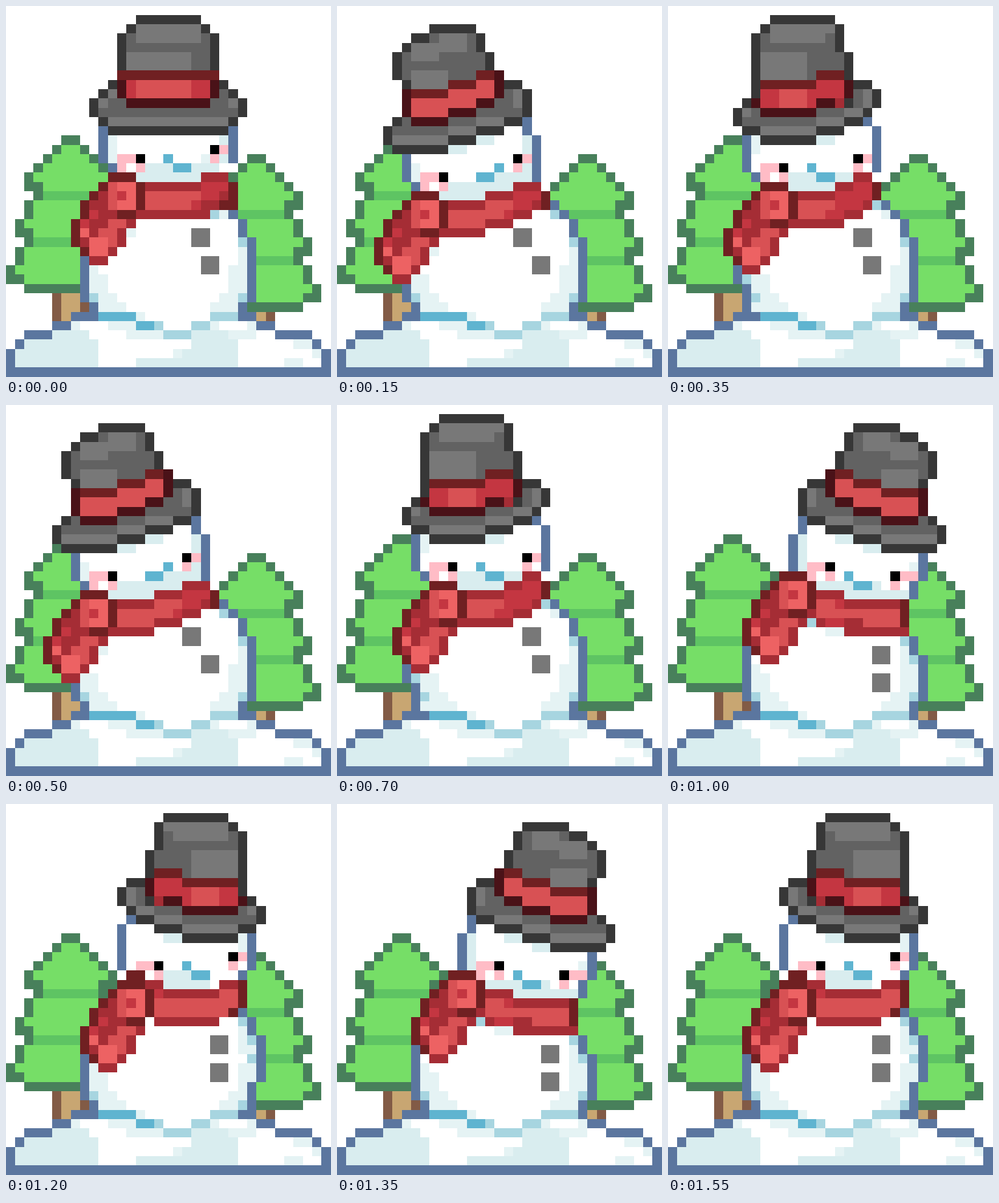
An HTML page with a canvas that plays this animation: 500x571 px, repeating every 1650 ms.

```html
<!DOCTYPE html>
<html lang="en">
<head>
<meta charset="utf-8">
<title>Swaying snowman</title>
<style>
html, body { margin: 0; height: 100%; overflow: hidden; background: #fff; }
canvas { display: block; }
</style>
</head>
<body>
<canvas width="500" height="571"></canvas>
<script>
const screen2d = document.querySelector('canvas').getContext('2d');
screen2d.imageSmoothingEnabled = false;

// The art is drawn small, with a spare column and row for the enlarged copy.
const art = document.createElement('canvas');
art.width = 36;
art.height = 41;
const ctx = art.getContext('2d');

const colours = {
  white: '#fff', black: '#000', pink: '#ffbcc6', blue: '#5b769f', cyan: '#5fb4d0', ice: '#a7d5e0',
  shade: '#d9edef', pale: '#e5f3f4', leaf: '#76de67', leafBand: '#5ec463', leafEdge: '#48805b',
  bark: '#825b46', wood: '#c8a672', coal: '#373737', felt: '#626262', feltLight: '#787878',
  wine: '#4a1218', deep: '#702022', red: '#a52d35', crimson: '#c43641', rose: '#d85154', coral: '#ed6263'
};

// Fills one path per colour, in order; one unit is one art pixel.
function paint(layers, x = 0, y = 0, mirrored = false) {
  ctx.setTransform(mirrored ? -1 : 1, 0, 0, 1, mirrored ? 35 - x : x, y);
  for (const name in layers) {
    ctx.fillStyle = colours[name];
    ctx.fill(new Path2D(layers[name]));
  }
}

const tree = {
  bark: 'M5 31h4v3h-4z',
  wood: 'M6 31h2v3h-2z',
  leafEdge: 'M6 14h2v1h1v1h1v1h1v1h1v2h-1v1h1v2h1v2h-1v1h1v2h1v2h-2v1H2v-1H0v-2h1v-2h1v-1H1v-2h1v-2h1v-1H2v-2h1v-1h1v-1h1v-1h1z',
  leaf: 'M6 15h2v1h1v1h1v1h1v1h-1v1H4v-1H3v-1h1v-1h1v-1h1z M3 21h8v2h1v1h-1v1H3v-1H2v-1h1z M2 26h10v2h1v1h-1v1H2v-1H1v-1h1z',
  leafBand: 'M4 20h6v1H4z M3 25h8v1H3z'
};

const ground = {
  white: 'M24 34h5v2h-5z',
  shade: 'M5 35h4v1h1v3H1v-2h1v-1h3z M20 35h4v1h1v3H14v-1h5v-1h1z',
  pale: 'M7 34h1v1H7z M11 34h3v1h3v1h-4v-1h-2z M14 33h1v1h-1z M22 34h1v1h-1z M26 34h1v1h-1z M24 35h3v1h-3z M18 37h1v1h-1z M31 36h2v1h1v1h-1v-1h-2z M30 38h2v1h-2z',
  ice: 'M16 34h1v1h-1z M17 35h3v1h-3z M20 34h2v1h-2z M22 33h3v1h-3z',
  cyan: 'M10 33h4v1h-4z M14 34h2v1h-2z',
  blue: 'M7 33h3v1H7z M25 33h2v1h-2z M5 34h2v1H5z M27 34h2v1h-2z M2 35h3v1H2z M29 35h4v1h-4z M1 36h1v1H1z M33 36h1v1h-1z M0 37h1v2h33v-2h1v3H0z'
};

const hats = {
  upright: {
    coal: 'M14 1h7v1h1v1h1v5h1v1h1v1h1v2h-1v1h-1v1H11v-1h-1v-1H9v-2h1V9h1V8h1V3h1V2h1z',
    felt: 'M14 2h7v1h1v4h-9V3h1z M11 9h1v1h11V9h1v1h1v2h-1v1H11v-1h-1v-2h1z',
    feltLight: 'M14 2h7v2h-7z M13 5h7v2h-7z M11 9h1v1h-1v1h-1v-1h1z M24 10h1v1h-1z M11 12h13v1H11z',
    deep: 'M12 7h11v1H12z',
    wine: 'M12 8h1v2h9V8h1v2h-1v1h-9v-1h-1z',
    crimson: 'M13 8h9v2h-9z',
    rose: 'M14 8h6v2h-6z'
  },
  leaning: {
    coal: 'M11 1h7v1h1v3h1v3h2v1h1v2h-1v1h-1v1h-2v1h-3v1h-6v-1h-2v-1h-1v-2h1v-1h1V3h1V2h1z',
    felt: 'M10 3h8v2h1v3h-9z M20 9h2v2h-1v1h-2v1h-3v1h-6v-1H8v-2h12z',
    feltLight: 'M11 2h7v1h-1v1h-6z M10 5h5v3h-5z M21 9h1v2h-1z M8 11h1v1H8z M10 13h6v1h-6z M19 11h2v1h-2z M16 12h3v1h-3z',
    deep: 'M16 7h3v1h-3v1h-6V8h6z',
    crimson: 'M16 8h3v2h-3v1h-6V9h6z',
    rose: 'M12 9h3v2h-3z',
    wine: 'M19 8h1v2h-1v1h-3v1h-6v-1H9v-1h1v1h6v-1h3z',
    red: 'M18 10h1v1h-1z'
  },
  bowed: {
    coal: 'M10 2h5v1h1v2h1v2h1v1h2v1h1v3h-1v1h-2v1h-3v1h-3v1H6v-1H5v-2h1v-1h1V8H6V5h1V4h1V3h2z',
    felt: 'M10 3h5v2h1v2h-1v1h-3v1H8V8H7V5h1V4h2z M18 9h2v3h-2v1h-3v1h-3v1H6v-2h1v-1h5v-1h3v-1h3z',
    feltLight: 'M11 3h3v2h-3v1H8V4h3z M8 7h4v2H8z M19 9h1v2h-1z M15 12h3v1h-3v1h-3v-1h3z M6 14h6v1H6z',
    wine: 'M17 7h1v3h-1v1h-2v1h-3v1H8v-1H7V9h1v3h4v-1h3v-1h2z',
    deep: 'M15 7h2v1h-1v1h-4v1H8V9h4V8h3z',
    rose: 'M15 8h2v2h-2v1h-3v1H8v-2h4V9h3z'
  }
};

const heads = {
  upright: {
    white: 'M11 13h13v6H11z',
    pale: 'M11 14h1v3h-1z M21 16h1v1h-1z',
    shade: 'M23 14h1v1h-1z M23 16h1v1h-1z M15 17h8v1h-1v1h-8v-1h1z',
    blue: 'M10 13h1v4h-1z M24 13h1v4h-1z M11 17h1v1h-1z'
  },
  leaning: {
    white: 'M9 12h12v1h1v7H10v-2H9z',
    pale: 'M9 14h1v2H9z',
    shade: 'M16 14h2v1h-2z M13 18h7v1h-2v1h-5z',
    blue: 'M21 12h1v1h-1z M22 13h1v5h-1z M8 14h1v4H8z M9 18h1v1H9z'
  },
  bowed: {
    white: 'M8 12h12v2h1v7H9v-2H8z',
    pale: 'M8 17h1v2H8z',
    shade: 'M20 14h1v4h-1z M15 14h2v1h-2z M12 15h2v1h-2z M17 18h4v1h-4z M12 19h7v1h-3v1H9v-1h3z',
    blue: 'M20 12h1v2h-1z M21 14h1v5h-1z M7 16h1v3H7z M8 19h1v2H8z'
  }
};

const knot = {
  red: 'M11 18h3v1h1v3h-1v2h-1v2h-1v1h-1v1H9v-1H8v-1H7v-3h1v-2h1v-1h1v-1h1z',
  deep: 'M11 18h3v1h-3z M14 19h1v3h-1v1h-2v-1h2z M10 19h1v1h-1v1H9v2H8v-2h1v-1h1z M7 23h1v3H7z M8 26h1v1H8z',
  rose: 'M11 19h1v3h-1z M11 23h2v1h-1v2h-1v-1h-1v-1h1z',
  coral: 'M12 19h2v3h-2z M8 24h1v1H8z M9 25h2v2H9z',
  crimson: 'M12 20h1v1h-1z M9 22h1v1H9v1H8v-1h1z'
};

const leftShade = { pale: 'M9 28h1v1h1v2h1v1h1v1H9z', ice: 'M9 31h1v1H9z' };
const rightShade = { pale: 'M25 26h1v6h-1v1h-3v-1h1v-1h1v-3h1z', ice: 'M25 25h1v1h-1z M25 31h1v1h-1z' };
const leftEye = { pink: 'M-2 0h2v1h1v1h-1v-1h-1v1h-1z', white: 'M-1 1h1v1h-1z', black: 'M0 0h1v1H0z' };
const rightEye = { pink: 'M1 0h1v1h-1v1h-1v-1h1z', black: 'M0 0h1v1H0z' };
const nose = { cyan: 'M0 0h1v1h2v1H1V1H0z' };
const button = { feltLight: 'M0 0h2v2H0z' };

const poses = {
  centre: {
    tilt: 'upright', knot: [0, 0], shadeLeft: 0, shadeRight: 0,
    eyes: [14, 16, 22, 15], nose: [17, 16], buttons: [20, 24, 21, 27],
    body: {
      white: 'M9 22h15v1h1v2h1v7h-1v1H9z',
      ice: 'M22 22h1v1h-1z',
      pale: 'M23 22h1v1h-1z M13 24h1v1h-1z',
      blue: 'M8 27h1v5H8z M9 32h1v1H9z M24 22h1v1h-1z M25 23h1v2h-1z M26 25h1v7h-1z M25 32h1v1h-1z'
    },
    scarf: {
      red: 'M21 18h3v4h-2v1h-8v-4h7z',
      rose: 'M15 20h6v2h-6z',
      crimson: 'M21 19h3v1h-1v1h-2v1h-1v-1h1z',
      deep: 'M24 19h1v3h-2v-1h1z'
    }
  },
  left: {
    tilt: 'leaning', knot: [-1, 1], shadeLeft: 0, shadeRight: 0,
    eyes: [12, 17, 20, 16], nose: [15, 17], buttons: [20, 24, 21, 27],
    body: {
      white: 'M10 21h13v1h1v1h1v2h1v7h-1v1H9v-3H8v-4h2z',
      ice: 'M22 21h1v1h-1z M8 29h1v1H8z',
      pale: 'M23 22h1v1h-1z',
      blue: 'M7 28h1v2H7z M8 30h1v3H8z M23 21h1v1h-1z M24 22h1v1h-1z M25 23h1v2h-1z M26 25h1v7h-1z M25 32h1v1h-1z'
    },
    scarf: {
      red: 'M20 18h2v1h1v2h-1v1h-1v1h-2v1h-6v-4h5v-1h2z',
      rose: 'M14 21h4v1h-1v1h-3z',
      crimson: 'M20 19h2v2h-1v1h-2v1h-2v-1h1v-2h2z',
      deep: 'M22 19h1v2h-1z'
    }
  },
  farLeft: {
    tilt: 'bowed', knot: [-3, 2], shadeLeft: -1, shadeRight: 0,
    eyes: [11, 18, 19, 16], nose: [17, 17], noseFlipped: true, buttons: [19, 24, 21, 27],
    body: {
      white: 'M10 21h13v1h1v1h1v2h1v7h-1v1H9v-1H8v-8h2z',
      ice: 'M23 22h1v1h-1z',
      pale: 'M10 26h1v1h-1z',
      cyan: 'M9 33h1v1H9z',
      blue: 'M7 30h1v2H7z M8 32h1v1H8z M23 21h1v1h-1z M24 22h1v1h-1z M25 23h1v2h-1z M26 25h1v7h-1z M25 32h1v1h-1z'
    },
    scarf: {
      red: 'M19 19h3v1h1v2h-2v1h-2v1h-3v1h-5v-4h5v-1h3z',
      rose: 'M16 21h3v1h-1v1h-2v1h-4v-2h4z',
      crimson: 'M19 20h3v1h-1v1h-2v1h-1v-1h1z',
      deep: 'M22 20h1v2h-1z'
    }
  },
  right: {
    tilt: 'leaning', mirrored: true, knot: [1, 1], shadeLeft: 0, shadeRight: 1,
    eyes: [16, 17, 24, 16], nose: [19, 17], buttons: [22, 25, 22, 28],
    body: {
      white: 'M10 22h15v1h1v2h1v5h-1v3H9v-6h1z',
      ice: 'M25 23h1v1h-1z M26 27h1v1h-1z M25 32h1v1h-1z',
      pale: 'M25 24h1v3h-1z',
      blue: 'M8 27h1v5H8z M9 32h1v1H9z M25 22h1v1h-1z M26 23h1v2h-1z M27 25h1v5h-1z M26 30h1v3h-1z'
    },
    scarf: {
      red: 'M23 19h3v3h-1v1h-2v1h-7v-3h-1v-2h2v1h6z',
      rose: 'M23 20h2v2h-1v1h-8v-2h7z',
      crimson: 'M16 20h1v1h-1z',
      deep: 'M25 19h1v3h-1v1h-1v-1h1z M13 18h2v1h-2z'
    }
  },
  farRight: {
    tilt: 'bowed', mirrored: true, knot: [1, 0], shadeLeft: 0, shadeRight: 1,
    eyes: [17, 17, 24, 18], nose: [19, 18], buttons: [22, 26, 22, 29],
    body: {
      white: 'M10 22h16v5h1v5h-1v1H9v-9h1z',
      ice: 'M15 23h1v1h-1z M25 25h1v1h-1z M26 27h1v1h-1z M25 33h1v1h-1z',
      pale: 'M17 24h2v1h-2z M25 26h1v2h-1z',
      blue: 'M8 26h1v6H8z M9 32h1v1H9z M26 25h1v2h-1z M27 27h1v5h-1z M26 32h1v1h-1z'
    },
    scarf: {
      red: 'M16 20h3v1h7v4h-7v-1h-3v-1h-1v-1h1z',
      rose: 'M16 21h2v1h7v2h-4v-1h-5z',
      crimson: 'M18 21h1v1h-1z M17 23h2v1h-2z',
      deep: 'M25 21h1v3h-1z',
      pink: 'M26 18h1v1h-1z'
    }
  }
};

function draw(pose) {
  ctx.resetTransform();
  ctx.clearRect(0, 0, art.width, art.height);
  paint(tree);
  paint(tree, 20, 2);
  paint(ground);

  const { white, ...bodyDetail } = pose.body;
  paint({ white });
  paint(leftShade, pose.shadeLeft);
  paint(rightShade, pose.shadeRight);
  paint(bodyDetail);
  const [x1, y1, x2, y2] = pose.buttons;
  paint(button, x1, y1);
  paint(button, x2, y2);

  paint(heads[pose.tilt], 0, 0, pose.mirrored);
  const [leftX, leftY, rightX, rightY] = pose.eyes;
  paint(leftEye, leftX, leftY);
  paint(rightEye, rightX, rightY);
  const [noseX, noseY] = pose.nose;
  paint(nose, pose.noseFlipped ? 34 - noseX : noseX, noseY, pose.noseFlipped);

  paint(pose.scarf);
  paint(knot, ...pose.knot);
  paint(hats[pose.tilt], 0, 0, pose.mirrored);

  // Shifted by almost half a pixel so that cell edges round down.
  screen2d.clearRect(0, 0, 500, 571);
  screen2d.drawImage(art, -0.49, -0.49, art.width * 500 / 35, art.height * 571 / 40);
}

const sway = [
  ['centre', 150], ['farLeft', 200], ['left', 150], ['farLeft', 200], ['left', 150],
  ['centre', 150], ['farRight', 200], ['right', 150], ['farRight', 200], ['right', 100]
];
const loop = sway.reduce((sum, [, hold]) => sum + hold, 0);
const start = performance.now();

function tick() {
  let time = (performance.now() - start) % loop;
  const [name] = sway.find(([, hold]) => (time -= hold) < 0);
  draw(poses[name]);
  requestAnimationFrame(tick);
}
tick();
</script>
</body>
</html>
```
